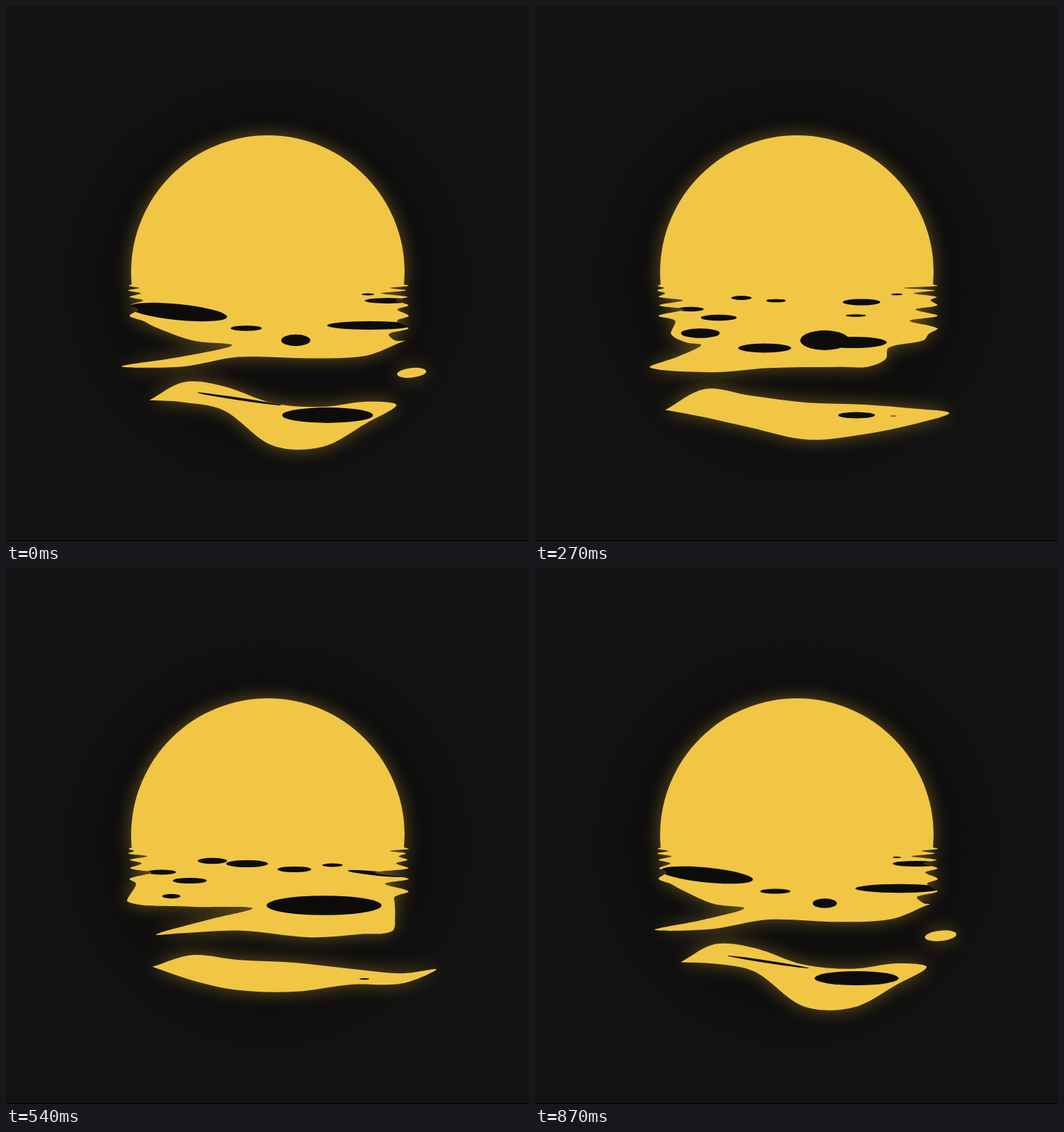
Animation of 740x757 px, one loop 0.9 s. Source, as an HTML page with a canvas:

```html
<!DOCTYPE html>
<html lang="en">
<head>
<meta charset="utf-8">
<title>Sun over water</title>
<style>
html, body { margin: 0; width: 740px; height: 757px; overflow: hidden; }
body { background: radial-gradient(circle at 370px 390px, #0e0e0e 210px, #131313 310px); }
body::after { content: ""; position: absolute; left: 0; top: 756px; width: 740px; height: 1px; background: #000; }
canvas { display: block; filter: drop-shadow(0 0 12px rgba(240, 185, 50, .4)); }
</style>
</head>
<body>
<canvas id="stage" width="740" height="757"></canvas>
<script>
const ctx = document.getElementById("stage").getContext("2d");
const GOLD = "#f1c645", DARK = "#0d0c0b";
const LOOP = 900, STEP = 30, HORIZON = 394;
let now = 0, phase = 0;

const mix = (a, b, k) => a + (b - a) * k;
const rand = n => { const v = Math.sin(n * 12.9898) * 43758.5453; return v - Math.floor(v); };

// A value that sways once (or `turns` times) per loop, highest at `peak` degrees.
const sway = (mean, size, peak, turns = 1) =>
  mean + size * Math.cos(turns * phase - peak * Math.PI / 180);

// Smooth path through the points; sharp reversals stay pointed.
function trace(points) {
  const tangents = points.map((p, i) => {
    const a = points[Math.max(i - 1, 0)], b = points[Math.min(i + 1, points.length - 1)];
    const len = Math.hypot(p[0] - a[0], p[1] - a[1]) + Math.hypot(b[0] - p[0], b[1] - p[1]) || 1;
    return [(b[0] - a[0]) / len, (b[1] - a[1]) / len];
  });
  ctx.lineTo(...points[0]);
  for (let i = 1; i < points.length; i++) {
    const [p, q, u, v] = [points[i - 1], points[i], tangents[i - 1], tangents[i]];
    const reach = Math.hypot(q[0] - p[0], q[1] - p[1]) / 3;
    ctx.bezierCurveTo(p[0] + u[0] * reach, p[1] + u[1] * reach,
      q[0] - v[0] * reach, q[1] - v[1] * reach, q[0], q[1]);
  }
}

// Ragged side: spurs and notches that spread out with depth. dir is 1 on the right, -1 on the left.
function fringe(edge, dir, count) {
  const points = [];
  for (let j = 0; j < count; j++) {
    const y = HORIZON + 2 + 5 * j + 1.4 * j * j, seed = 10 * dir + j;
    const depth = (10 + 32 * rand(seed)) * sway(.6, .4, 360 * rand(seed + 40));
    points.push([edge + dir * (2 + 6 * rand(seed + 80)), y], [edge - dir * depth, y + 3 + j]);
  }
  return points;
}

function drawSun() {
  const rightTip = [sway(528, 34, 15, 2), sway(495, 20, 185)];
  const leftTip = [sway(182, 32, 235), sway(513, 4, 220)];
  const shoulder = [sway(192, 20, 20), sway(463, 9, 190)];
  const bite = [sway(290, 60, 60, 2), 480];

  ctx.fillStyle = GOLD;
  ctx.beginPath();
  ctx.arc(370.5, 376.5, 193.5, Math.PI - .09, .09);
  trace([
    [563, HORIZON], ...fringe(563, 1, 6), [550, 473],
    [rightTip[0] + 4, mix(473, rightTip[1], .4)], rightTip,
    [mix(430, rightTip[0], .6), sway(507, 12, 180)],
    [430, sway(510, 12, 195)], [330, sway(506, 10, 160)], [250, sway(514, 5, 140)], leftTip,
    [mix(leftTip[0], bite[0], .55), 496], bite,
    [mix(shoulder[0], bite[0], .5), mix(shoulder[1], bite[1], .75)], shoulder,
    ...fringe(178, -1, 5).reverse(), [178, HORIZON]
  ]);
  ctx.fill();
}

function drawWave() {
  const left = [sway(200, 16, 280), sway(563, 9, 125)];
  const right = [sway(582, 30, 190), sway(568, 8, 115)];
  const lift = sway(0, 6, 0, 2);
  const spread = heights => heights.map((y, i) =>
    [mix(left[0], right[0], [.14, .3, .5, .7, .88][i]), y + lift]);
  const crest = spread([sway(538, 13, 155), sway(545, 15, 150), sway(558, 8, 105), sway(564, 5, 125), sway(565, 13, 150)]);
  const belly = spread([sway(572, 20, 150), sway(585, 22, 150), sway(609, 14, 60), sway(604, 18, 40), sway(587, 9, 110)]);

  ctx.fillStyle = GOLD;
  ctx.beginPath();
  trace([left, ...crest, right, ...belly.reverse(), left]);
  ctx.fill();
}

// An oval that swells to half width r at time `peak` and is gone half a life before and after.
function ripple(x, y, r, peak, life, flat = .17, tilt = 0) {
  const away = Math.abs(now - peak);
  const size = r * Math.cos(Math.PI * Math.min(away, LOOP - away, life / 2) / life);
  ctx.beginPath();
  ctx.ellipse(x, y, size, size * flat, tilt, 0, 2 * Math.PI);
  ctx.fill();
}

function drawRipples() {
  ctx.globalCompositeOperation = "source-atop";
  ctx.fillStyle = DARK;
  // Open water inside the reflection
  ripple(410, 473, 35, 240, 800, .4);
  ripple(340, 456, 22, 0, 360);
  ripple(292, 413, 23, 450, 640, .2);
  ripple(341, 417, 32, 470, 560);
  ripple(462, 419, 31, 360, 520);
  ripple(512, 408, 16, 130, 420);
  ripple(454, 438, 22, 330, 220, .13);
  ripple(408, 425, 25, 570, 320);
  ripple(260, 441, 34, 400, 560);
  ripple(234, 463, 31, 350, 520, .25);
  ripple(325, 484, 47, 340, 340);
  // Fingers reaching in from the sides
  ripple(220, 429, 22, 430, 900);
  ripple(243, 433, 71, 20, 400, .16, .1);
  ripple(515, 452, 62, 880, 300, .1);
  ripple(540, 417, 34, 870, 300, .12);
  ripple(525, 431, 50, 600, 320, .07, .1);
  ripple(450, 476, 115, 430, 440);
  // Openings in the loose wave
  ripple(455, 579, 68, 60, 560);
  ripple(330, 556, 60, 0, 400, .03, .15);
  ripple(507, 580, 10, 430, 440, .13);
  ctx.globalCompositeOperation = "source-over";
}

function draw(time) {
  now = time;
  phase = 2 * Math.PI * time / LOOP;
  ctx.clearRect(0, 0, 740, 757);
  drawSun();
  drawWave();
  drawRipples();
  ctx.fillStyle = GOLD;
  ripple(574, 519, 23, 880, 140, .33, -.1);
}

const start = performance.now();
function tick() {
  const time = (performance.now() - start) % LOOP;
  draw(Math.floor(time / STEP) * STEP);
  requestAnimationFrame(tick);
}
tick();
</script>
</body>
</html>
```
